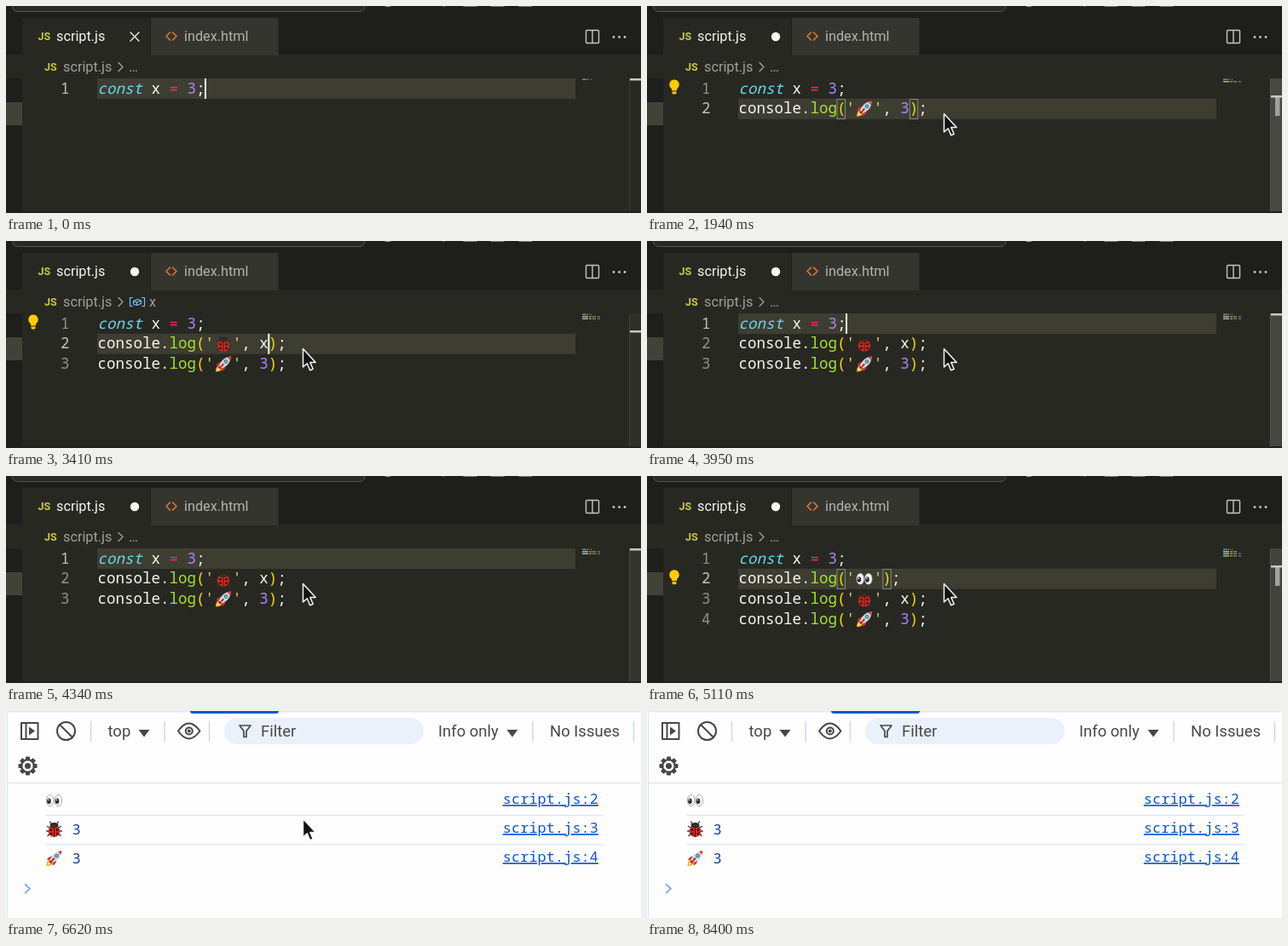
Recreate the animation shown at these times as an HTML page. Size 745 by 243 pixels, loop 9100 ms.

```html
<!DOCTYPE html>
<html lang="en">
<head>
<meta charset="utf-8">
<title>Console log shortcuts</title>
<style>
  html, body { margin: 0; width: 100%; height: 100%; overflow: hidden; background: #272822; }
  svg { display: block; }
  text { white-space: pre; }
  .code { font: 17.5px "Noto Sans Mono", monospace; fill: #f8f8f2; }
  .ui { font: 16.25px Roboto, sans-serif; }
  .js { font: bold 12.5px Roboto, sans-serif; fill: #cbcb41; }
  .tool { font: 18.5px Roboto, sans-serif; fill: #474747; }
  .out { font: 17px "Noto Sans Mono", monospace; fill: #0842a0; }
  .link { fill: #0b57d0; text-anchor: end; text-decoration: underline; }
  .kw { fill: #66d9ef; font-style: italic; }
  .op { fill: #f92672; }
  .num { fill: #ae81ff; }
  .fn { fill: #a6e22e; }
  .str { fill: #e6db74; }
  .par { fill: #ffd700; }
  .line { fill: none; stroke-linecap: round; stroke-linejoin: round; }
</style>
</head>
<body>
<svg id="stage" width="745" height="243" viewBox="0 0 745 243">
  <defs>
    <symbol id="rocket" viewBox="0 0 20 20">
      <path d="M1 19c0-4 1-6.500 4-7.500l3.500 3.500C7.500 18 5 19 1 19z" fill="#ffa726"/>
      <path d="M2.500 17.500c.2-2.500 1-3.500 2.600-4l1.500 1.500c-.6 1.600-1.800 2.400-4.100 2.500z" fill="#fff176"/>
      <path d="M8 7.500C5 7.300 2.800 8.800 1.500 12l5-.5zM12.500 12c.2 3-1.300 5.200-4.500 6.500l.5-5z" fill="#d32f2f"/>
      <path d="M5 12C7 6 11 2 19 1c-1 8-5 12-11 14z" fill="#cfd8dc"/>
      <path d="M14.500 2.100C16 1.500 17.500 1.200 19 1c-.2 1.500-.5 3-1.100 4.500z" fill="#e53935"/>
      <path d="M5 12l3 3-2 1-2-2zM9.500 9l1.500 1.500-4 4-1-1z" fill="#b71c1c"/>
      <circle cx="13" cy="7" r="2.300" fill="#455a64"/><circle cx="13" cy="7" r="1.500" fill="#4fc3f7"/>
    </symbol>
    <symbol id="bug" viewBox="0 0 20 20">
      <path class="line" d="M7 4L5 1M13 4l2-3M5 8L2 6.500M15 8l3-1.500M4 12H1.200M16 12h2.800M5 15l-2.500 2.500M15 15l2.500 2.500" stroke="#3b2a2a" stroke-width="1.300"/>
      <ellipse cx="10" cy="5.500" rx="5" ry="3.500" fill="#2b2526"/>
      <ellipse cx="10" cy="12" rx="7" ry="7" fill="#d8281f"/>
      <path d="M10 5v14" stroke="#3a1616" stroke-width="1"/>
      <path d="M5 7a7 4 0 0 1 10 0q-5 2-10 0z" fill="#2b2526"/>
      <g fill="#2b1a1a"><circle cx="6.500" cy="10.500" r="1.500"/><circle cx="13.500" cy="10.500" r="1.500"/><circle cx="6.500" cy="15" r="1.500"/><circle cx="13.500" cy="15" r="1.500"/></g>
    </symbol>
    <symbol id="eyes" viewBox="0 0 20 20">
      <g fill="#fafafa" stroke="#8a8a8a" stroke-width=".7"><ellipse cx="5.200" cy="10" rx="4.400" ry="6.600"/><ellipse cx="14.800" cy="10" rx="4.400" ry="6.600"/></g>
      <g fill="#2c2c2e"><ellipse cx="3.900" cy="10.800" rx="2.300" ry="3.200"/><ellipse cx="13.500" cy="10.800" rx="2.300" ry="3.200"/></g>
      <g fill="#fff"><circle cx="3.300" cy="9.400" r=".8"/><circle cx="12.900" cy="9.400" r=".8"/></g>
    </symbol>
  </defs>

  <g id="editor">
    <rect width="745" height="243" fill="#1e1f1c"/>
    <rect x="7.500" y="-20" width="413.500" height="26.500" rx="6" fill="#292a27" stroke="#555650"/>
    <g class="line" stroke="#9a9a96" stroke-width="1.300">
      <path d="M443 -1q5 3 10 0M513 0h1M537 0h15M569 0h15M602 0h15"/>
    </g>
    <rect y="57" width="745" height="28" fill="#272822"/>
    <rect y="113" width="19" height="27" fill="#414339"/>
    <rect x="19" y="57" width="726" height="186" fill="#272822"/>
    <rect x="19" y="14" width="150" height="44" fill="#272822"/>
    <rect x="170" y="14" width="149.500" height="44" fill="#34352f"/>
    <rect y="241" width="745" height="2" fill="#241f1d"/>

    <text class="js" x="37.500" y="40">JS</text>
    <text class="ui" x="59" y="41" fill="#f8f8f2">script.js</text>
    <path id="close" class="line" d="M146 31l10 10M156 31l-10 10" stroke="#f0f0ea" stroke-width="1.400"/>
    <circle id="dirty" cx="151" cy="36" r="5.200" fill="#f8f8f2"/>
    <path class="line" d="M192.500 31l-4.500 4.500 4.500 4.500M195.500 31l4.500 4.500-4.500 4.500" stroke="#e37933" stroke-width="1.600"/>
    <text class="ui" x="209" y="41" fill="#b4b4ae">index.html</text>

    <g class="line" stroke="#c5c5c5" stroke-width="1.400">
      <rect x="680.500" y="28.500" width="15" height="15" rx="1"/>
      <path id="splitV" d="M688 28.500v15"/><path id="splitH" d="M680.500 36h15"/>
    </g>
    <g fill="#c5c5c5"><circle cx="713" cy="36.500" r="1.400"/><circle cx="719.500" cy="36.500" r="1.400"/><circle cx="726" cy="36.500" r="1.400"/></g>

    <text class="js" x="45" y="76">JS</text>
    <g class="ui" fill="#a2a29c">
      <text x="67" y="77">script.js</text>
      <path class="line" d="M132 66.500l5 5-5 5" stroke="#a2a29c" stroke-width="1.300"/>
      <text id="crumbDots" x="144" y="77">…</text>
      <g id="crumbX">
        <path class="line" d="M148.500 66.500h-3v10h3M159.500 66.500h3v10h-3M149.500 70.500l5-2 4 1.500v3.500l-5 2-4-1.500zl4 1.500 5-2M153.500 72v3.500" stroke="#75beff" stroke-width="1.200"/>
        <text x="168" y="77">x</text>
      </g>
    </g>

    <rect id="current" x="107" width="561" height="24" fill="#3e3d32"/>
    <g id="gutter" class="code" text-anchor="end"></g>
    <g id="boxes" fill="#006400" fill-opacity=".1" stroke="#888" stroke-width="1">
      <rect x="223" y="109.500" width="9.500" height="23"/><rect id="boxEnd" y="109.500" width="9.500" height="23"/>
    </g>
    <g id="lines"></g>
    <rect id="caret" width="2" height="24" fill="#f8f8f0"/>
    <g id="bulb" fill="#ffcc00">
      <path d="M32 86.500a5.800 5.800 0 0 1 3.300 10.500l-.6 2.500h-5.400l-.6-2.500A5.800 5.800 0 0 1 32 86.500z"/>
      <path d="M29.500 100.500h5v1.500a1.500 1.500 0 0 1-1.500 1.500h-2a1.500 1.500 0 0 1-1.500-1.500z"/>
    </g>
    <g id="map"></g>
    <path d="M731.500 85v156" stroke="#3c3d38"/>
    <rect id="slider" x="731" y="85" width="14" height="156" fill="#797979" fill-opacity=".4"/>
    <rect id="stem" x="737" y="105" width="5.500" height="24" fill="#a0a0a0"/>
    <rect id="mark" x="732" width="13" height="2.500" fill="#c8c8c2"/>
  </g>

  <g id="console">
    <rect width="745" height="243" fill="#fefefe"/>
    <rect width="745" height="1.500" fill="#e1eafa"/>
    <path d="M216 0h104q0 3-3 3h-98q-3 0-3-3z" fill="#0b57d0"/>
    <path d="M1.500 2v241M2 84.500h743" stroke="#d3e3fd"/>
    <path d="M99.500 12v24M186 12v24M238.500 12v24M618 12v24M736.500 12v24" stroke="#c9d9f3" stroke-width="1.500"/>
    <g class="line" stroke="#474747" stroke-width="2">
      <rect x="18" y="14" width="19.500" height="19"/><path d="M23.500 14v19"/>
      <circle cx="70.500" cy="23.500" r="10.500"/><path d="M63 16l15 15"/>
      <path d="M202 23.500q12.500-18 25.500 0q-13 18-25.500 0z"/><circle cx="214.800" cy="23.500" r="4"/>
    </g>
    <g fill="#474747">
      <path d="M27 18.500l7 5-7 5zM155.500 22h13l-6.500 8.500zM587.500 22h13l-6.500 8.500z"/>
      <circle cx="214.800" cy="23.500" r="2"/>
    </g>
    <rect x="256" y="8" width="234" height="31" rx="15.500" fill="#ebf1fb"/>
    <path class="line" d="M274 17h13l-5 6.500v7h-3v-7z" stroke="#474747" stroke-width="1.700"/>
    <g class="tool">
      <text x="119.500" y="30">top</text><text x="299" y="30">Filter</text>
      <text x="507" y="30">Info only</text><text x="638" y="30">No Issues</text>
    </g>
    <g id="gear" transform="translate(25.500 64.500)" fill="#474747"></g>
    <g id="rows"></g>
    <g id="prompt"><path class="line" d="M22.500 203.500l5.500 5-5.500 5" stroke="#7cacf8" stroke-width="1.800"/></g>
    <rect id="input" x="42" y="91" width="1" height="23" fill="#1f1f1f"/>
  </g>

  <path id="mouse" d="M348.500 126.500v21.500l4.800-4.300 3.400 8 3.500-1.500-3.400-7.800h6.400z" fill="#111" stroke="#f4f4f4" stroke-width="1.500" stroke-linejoin="round"/>
</svg>
<script>
const LOOP = 9100, BLINK = 480;
const CELL = 10.5, LEFT = 107.5, PITCH = 23.75, TOP = 85;
const EMOJI_W = 21.8, EMOJI_X = LEFT + 13 * CELL, TAIL_X = EMOJI_X + EMOJI_W;
const ARG = TAIL_X + 4 * CELL, QUOTE = TAIL_X + CELL;
const col = n => LEFT + n * CELL;
const $ = id => document.getElementById(id);
const span = (cls, s) => `<tspan class="${cls}">${s}</tspan>`;
const code = (x, s) => `<text class="code" x="${x}" y="102.500">${s}</text>`;
const emoji = (id, x, y) => `<use href="#${id}" x="${x}" y="${y}" width="20" height="20"/>`;

const logLine = (id, arg) =>
  code(LEFT, 'console.' + span('fn', 'log') + span('par', '(') + span('str', "'")) +
  emoji(id, EMOJI_X + 1, 87) +
  code(TAIL_X, span('str', "'") + (arg && ', ' + arg) + span('par', ')') + ';');

// Minimap runs: start column, length, colour
const runs = list => list.map(([x, w, c]) =>
  `<rect x="${676 + x}" y="85.500" width="${w}" height="1.500" fill="${c}" opacity=".65"/>`).join('');
const logRuns = n => runs([[0, 7, '#f8f8f2'], [8, 3, '#a6e22e'], [12, 1, '#e6db74'],
  [13, 2, '#a08a80'], [15, 1, '#e6db74']].concat(n ? [[18, 1, '#ae81ff'], [19.500, 1, '#f8f8f2']] : []));

const lines = [
  [code(LEFT, `${span('kw', 'const')} x ${span('op', '=')} ${span('num', 3)};`),
    runs([[0, 5, '#66d9ef'], [6, 1, '#f8f8f2'], [8, 1, '#f92672'], [10, 1, '#ae81ff']])],
  [logLine('eyes', ''), logRuns(0)],
  [logLine('bug', 'x'), logRuns(1)],
  [logLine('rocket', span('num', 3)), logRuns(1)]
];
const group = i => lines.map(l => `<g>${l[i]}</g>`).join('');
$('lines').innerHTML = group(0);
$('map').innerHTML = group(1);
$('gutter').innerHTML = lines.map((_, i) =>
  `<text x="74.500" y="${102.5 + i * PITCH}">${i + 1}</text>`).join('');

$('rows').innerHTML = ['eyes', 'bug', 'rocket'].map((id, i) => {
  const y = 34 * i;
  return emoji(id, 46.5, 95 + y) +
    (i ? `<text class="out" x="77.500" y="${111 + y}">3</text><path d="M46 ${88.5 + y}h655" stroke="#d3e3fd"/>` : '') +
    `<text class="out link" x="695" y="${109 + y}">script.js:${i + 2}</text>`;
}).join('');

$('gear').innerHTML = Array.from({ length: 8 }, (_, i) =>
  `<rect x="-2.500" y="-11" width="5" height="5" rx="1" transform="rotate(${i * 45})"/>`).join('') +
  '<circle r="7.500" fill="none" stroke="#474747" stroke-width="2.200"/><circle r="3.500"/>';

const inserts = [1460, 3390, 4480];
// Caret: time, line, x
const carets = [
  [0, 1, col(12)], [280, 1, col(11)], [1460, 2, ARG],
  [2500, 1, col(12)], [2560, 1, col(11)], [2600, 1, col(10)], [2630, 1, col(9)], [2670, 1, col(8)], [2710, 1, col(7)],
  [3390, 2, ARG], [3730, 1, col(12)], [4480, 2, QUOTE], [5500, 2, QUOTE]
];
const bulbs = [[0, 0], [520, 1], [2000, 2], [2700, 1], [3500, 0], [5050, 2]];
const crumbs = [[0, 0], [520, 1], [1580, 0], [2740, 1], [3500, 0]];
const mice = [[0, 0], [160, .5], [220, 1], [8240, .5], [8400, 0]];
const pairs = [[0, 0], [1560, 1], [2500, 0], [3500, 1], [3730, 0], [4560, 1]];

const at = (list, t) => list.filter(e => e[0] <= t).pop();
const show = (el, on) => el.setAttribute('visibility', on ? 'inherit' : 'hidden');
const see = (id, on) => show($(id), on);
const set = (id, name, v) => $(id).setAttribute(name, v);
const clamp = v => Math.max(0, Math.min(1, v));

function drawEditor(t) {
  const done = inserts.filter(s => s <= t), n = 1 + done.length;
  const [since, line, x] = at(carets, t);
  const y = TOP + (line - 1) * PITCH;

  ['lines', 'map'].forEach((id, k) => [...$(id).children].forEach((g, i) => {
    const row = i ? i + n - 4 : 0;
    show(g, !i || row > 0);
    g.setAttribute('transform', `translate(0 ${row * (k ? 2.5 : PITCH)})`);
  }));
  [...$('gutter').children].forEach((g, i) => {
    show(g, i < n);
    g.style.fill = i + 1 === line ? '#c2c2bf' : '#90908a';
  });

  set('current', 'y', y);
  set('caret', 'x', x - .5);
  set('caret', 'y', y);
  see('caret', Math.floor((t - since) / BLINK) % 2 === 0);
  set('mark', 'y', line === 1 ? 85 : 105);

  const paired = at(pairs, t)[1];
  see('boxes', paired);
  see('stem', paired);
  set('boxEnd', 'x', x + .5);

  const bulb = at(bulbs, t)[1];
  see('bulb', bulb);
  set('bulb', 'transform', `translate(0 ${(bulb - 1) * PITCH})`);

  const crumb = at(crumbs, t)[1];
  see('crumbX', crumb);
  see('crumbDots', !crumb);

  // Scrollbar slider: quick fade in, pause, slow fade out
  const age = t - done[done.length - 1];
  set('slider', 'opacity', done.length ? Math.min(clamp(age / 100), 1 - clamp((age - 490) / 800)) : 0);

  const dirty = t >= 1460 && t < 5500, alt = t >= 5700;
  see('dirty', dirty);
  see('close', !dirty);
  see('splitH', alt);
  see('splitV', !alt);
}

function drawConsole(t) {
  const filled = t >= 6590;
  see('rows', filled);
  see('input', !filled && t >= 6190);
  set('prompt', 'transform', `translate(0 ${filled ? 0 : -106})`);
}

function frame() {
  const t = performance.now() % LOOP;
  const browser = t >= 5980;
  see('editor', !browser);
  see('console', browser);
  (browser ? drawConsole : drawEditor)(t);
  set('mouse', 'opacity', at(mice, t)[1]);
  requestAnimationFrame(frame);
}
frame();
</script>
</body>
</html>
```
